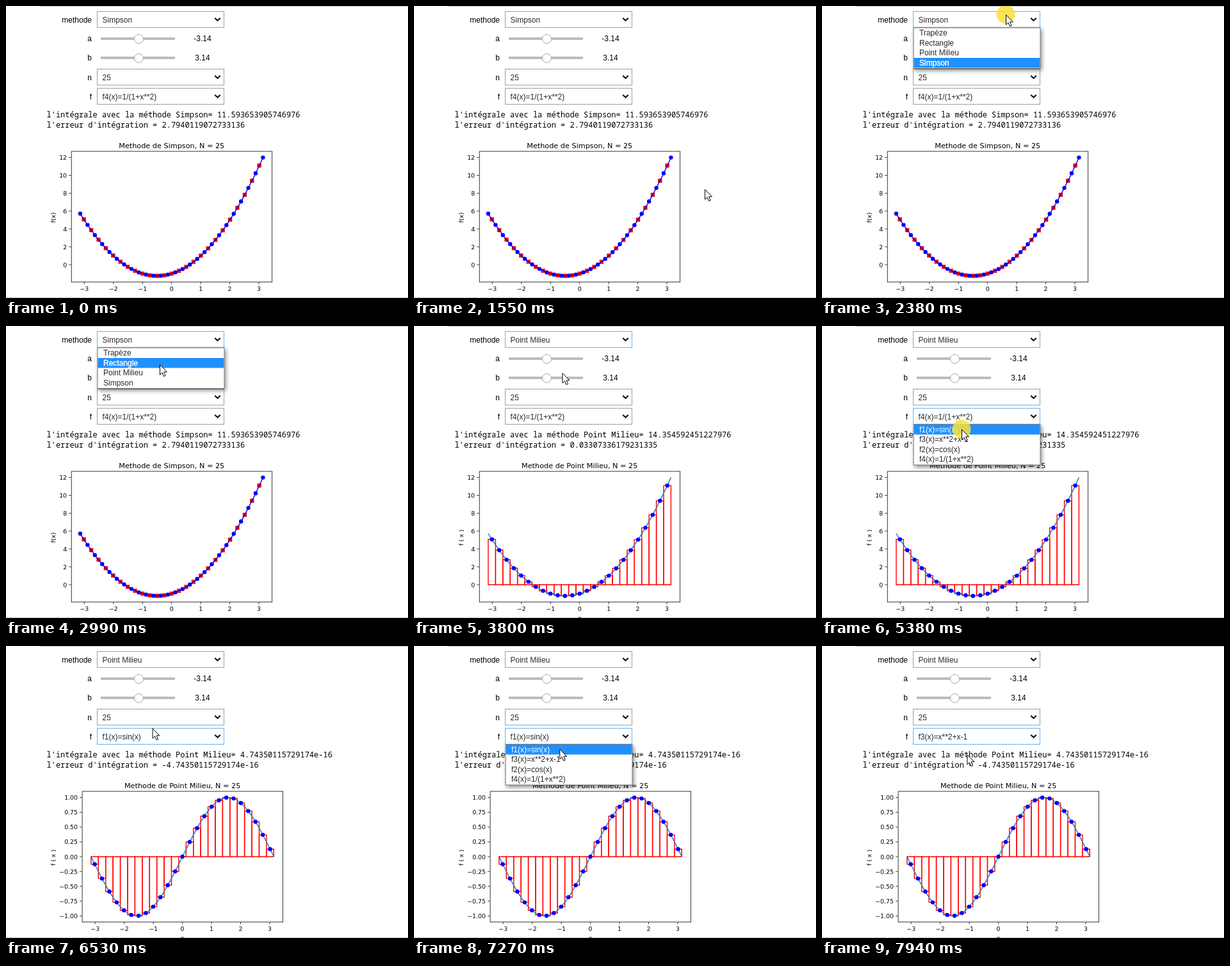
Recreate the animation shown at these times as an HTML page. Size 628x456 px, loop 8000 ms.

```html
<!DOCTYPE html>
<html lang="fr">
<head>
<meta charset="utf-8">
<title>Intégration numérique</title>
<style>
html, body { margin: 0; width: 100%; height: 100%; overflow: hidden; background: #fff; }
svg { display: block; width: 628px; height: 456px; }
text { white-space: pre; }
.ui { font: 12px "Liberation Sans", Arial, sans-serif; }
.out { font: 12px "Noto Sans Mono", monospace; }
.plot { font: 9.4px "DejaVu Sans", sans-serif; }
.menu { filter: drop-shadow(2px 3px 3px rgba(0, 0, 0, .45)); }
</style>
</head>
<body>
<svg id="stage" viewBox="0 0 628 456" xmlns="http://www.w3.org/2000/svg"></svg>
<script>
const NS = "http://www.w3.org/2000/svg";
const LOOP = 8000;
const stage = document.getElementById("stage");

function add(parent, tag, attrs, content) {
  const el = document.createElementNS(NS, tag);
  for (const k in attrs) el.setAttribute(k, attrs[k]);
  if (content !== undefined) el.textContent = content;
  parent.appendChild(el);
  return el;
}
const label = (parent, x, y, str, anchor = "start", more = {}) =>
  add(parent, "text", { x, y, "text-anchor": anchor, ...more }, str);
const show = (el, on) => el.setAttribute("visibility", on ? "visible" : "hidden");
const path = pts => "M" + pts.map(p => p[0].toFixed(2) + " " + p[1].toFixed(2)).join("L");
const num = (v, digits) => v.toFixed(digits).replace("-", "−");

// ---- controls ----
const ui = add(stage, "g", { class: "ui" });
add(ui, "rect", { x: 54, y: 0, width: 574, height: 1, fill: "#c8c8c8" });
add(ui, "rect", { x: 0, y: 455, width: 628, height: 1, fill: "#c8c8c8" });

function select(name, y, value) {
  label(ui, 134, y + 17.5, name, "end");
  const box = add(ui, "rect", { x: 142.5, y: y + .5, width: 198, height: 25, fill: "#fff" });
  const text = label(ui, 150.5, y + 17.5, value, "start", { fill: "#2a2a2a" });
  add(ui, "path", { d: `M326.3 ${y + 10.7}l4.2 4.2l4.2 -4.2`, fill: "none", stroke: "#000", "stroke-width": 2 });
  return { text, focus: on => box.setAttribute("stroke", on ? "#64b5f6" : "#9e9e9e") };
}
function slider(name, y, value) {
  label(ui, 134, y + 4, name, "end");
  add(ui, "rect", { x: 148, y: y - 2, width: 116, height: 4, fill: "#bdbdbd" });
  add(ui, "circle", { cx: 207.5, cy: y + .5, r: 7, fill: "#fff", stroke: "#a8a8a8" });
  label(ui, 307, y + 4, value, "middle");
}
const method = select("methode", 8, "Simpson");
slider("a", 51, "-3.14");
slider("b", 81, "3.14");
select("n", 98, "25").focus(false);
const func = select("f", 128, "f4(x)=1/(1+x**2)");

// ---- printed result ----
const out = add(stage, "g", { class: "out" });
const line1 = label(out, 63.5, 174, "");
const line2 = label(out, 63.5, 190, "");

// ---- charts ----
const A = -3.14, N = 25, H = -2 * A / N, UNIT = 45.45;
const poly = x => x * x + x - 1;

function chart(o) {
  const g = add(stage, "g", { class: "plot" });
  const X = x => o.cx + x * UNIT, Y = y => o.y0 - y * o.unit;
  const left = o.cx - 157, right = o.cx + 157, top = 227, bottom = 431;
  const curve = (n, color) => {
    const pts = Array.from({ length: n + 1 }, (_, i) => {
      const x = A - 2 * A * i / n;
      return [X(x), Y(o.fn(x))];
    });
    add(g, "path", { d: path(pts), fill: "none", stroke: color, "stroke-width": 1.4 });
  };
  const dot = x => add(g, "circle", { cx: X(x), cy: Y(o.fn(x)), r: 3.2, fill: "#00f" });
  const mids = Array.from({ length: N }, (_, i) => A + (i + .5) * H);

  if (o.bars) {
    for (const m of mids) {
      const y = Y(o.fn(m)), a = X(m - H / 2), b = X(m + H / 2);
      add(g, "path", { d: path([[a, o.y0], [a, y], [b, y], [b, o.y0]]) + "Z", fill: "none", stroke: "#f00", "stroke-width": 1.4 });
    }
    curve(100, "#1f77b4");
    mids.forEach(dot);
  } else {
    for (const m of mids)
      add(g, "rect", { x: X(m) - 3.2, y: Y(o.fn(m)) - 3.2, width: 6.4, height: 6.4, fill: "#f00" });
    curve(100, "#0000e0");
    for (let i = 0; i <= N; i++) dot(A + i * H);
  }

  add(g, "rect", { x: left + .5, y: top, width: right - left - .5, height: bottom - top, fill: "none", stroke: "#000", "stroke-width": .8 });
  let ticks = "";
  for (let x = -3; x <= 3; x++) {
    ticks += `M${X(x)} ${bottom}v3.4`;
    label(g, X(x), 445.2, num(x, 0), "middle");
  }
  for (let y = o.from; y <= o.to; y += o.step) {
    ticks += `M${left} ${Y(y)}h-3.4`;
    label(g, left - 6.6, Y(y) + 3.5, num(y, o.digits), "end");
  }
  add(g, "path", { d: ticks, stroke: "#000", "stroke-width": .8 });
  label(g, o.cx, 222, `Methode de ${o.title}, N = 25`, "middle", { "font-size": 11.25 });
  label(g, 0, 0, o.bars ? "f ( x )" : "f(x)", "middle", { transform: "translate(76.7 330.5) rotate(-90)" });
  if (o.bars) label(g, o.cx, 458.5, "x", "middle");
  return g;
}
const square = { fn: poly, cx: 258.7, y0: 404, unit: 13.95, from: 0, to: 12, step: 2, digits: 0 };
const sine = { fn: Math.sin, cx: 275.6, y0: 329, unit: 92.5, from: -1, to: 1, step: .25, digits: 2 };
const results = [
  { at: 0, name: "Simpson", value: "11.593653905746976", error: "2.7940119072733136", plot: chart({ ...square, title: "Simpson" }) },
  { at: 3800, name: "Point Milieu", value: "14.354592451227976", error: "0.03307336179231335", plot: chart({ ...square, title: "Point Milieu", bars: true }) },
  { at: 5710, name: "Point Milieu", value: "4.74350115729174e-16", error: "-4.74350115729174e-16", plot: chart({ ...sine, title: "Point Milieu", bars: true }) }
];

// ---- drop-down lists ----
const ROW = 15.5;
function menu(top, items, weight) {
  const g = add(stage, "g", { class: "ui menu" });
  add(g, "rect", { x: 143, y: top - .5, width: 198, height: ROW * items.length + 1.5, fill: "#fff", stroke: "#777", "stroke-width": 1 });
  const bar = add(g, "rect", { x: 143.5, width: 197, height: ROW, fill: "#1e90ff" });
  const texts = items.map((s, i) => label(g, 152, top + i * ROW + 11.7, s));
  return {
    draw(open, y, chosen) {
      show(g, open);
      const row = y < top ? chosen : Math.min(items.length - 1, Math.floor((y - top) / ROW));
      bar.setAttribute("y", top + row * ROW);
      texts.forEach((t, i) => {
        t.setAttribute("fill", i === row ? "#fff" : "#2a2a2a");
        t.setAttribute("stroke", i === row ? "#fff" : "none");
        t.setAttribute("stroke-width", weight);
      });
    }
  };
}
const funcs = ["f1(x)=sin(x)", "f3(x)=x**2+x-1", "f2(x)=cos(x)", "f4(x)=1/(1+x**2)"];
const methodMenu = menu(34.5, ["Trapèze", "Rectangle", "Point Milieu", "Simpson"], .4);
const funcMenu = menu(154, funcs, 0);

// ---- pointer ----
const glow = add(stage, "circle", { r: 14.5, fill: "#fbe03a", "fill-opacity": .85 });
const pointer = add(stage, "path", {
  d: "M.5 .7V16.2L4 12.9L6.5 18.7L9.1 17.6L6.6 11.9H11.4Z",
  fill: "#fff", stroke: "#000", "stroke-width": 1
});
// first change, last change, steps, x, y
const moves = [
  [1340, 2100, 12, 318, 30],
  [2170, 2310, 3, 287, 13],
  [2640, 2990, 6, 240, 60],
  [3190, 3260, 2, 237, 70],
  [3600, 3800, 4, 231.5, 73],
  [3930, 4280, 6, 228, 117],
  [4430, 4640, 4, 227, 142],
  [5110, 5310, 4, 218, 161],
  [6110, 6530, 7, 228.5, 128],
  [6730, 6800, 2, 228, 135],
  [7130, 7340, 4, 227, 169],
  [7540, 7540, 1, 226.5, 169]
];
function place(t) {
  let x = 568, y = 500;
  for (const [t0, t1, n, toX, toY] of moves) {
    if (t < t0) break;
    const k = n > 1 ? Math.floor((t - t0) / (t1 - t0) * (n - 1) + 1e-6) + 1 : 1;
    const p = Math.min(1, k / n);
    const e = t0 === 1340 ? 1 - (1 - p) ** 1.5 : p;
    x += (toX - x) * e;
    y += (toY - y) * e;
  }
  return [x, y];
}
const clicks = [[2310, 2440], [3530, 3660], [4840, 4910], [5380, 5510], [6870, 6930], [7740, 7870]];
const within = (t, [a, b]) => t >= a && t < b;

function draw(t) {
  const [x, y] = place(t);
  pointer.setAttribute("transform", `translate(${x} ${y})`);
  show(pointer, t >= 1340);
  glow.setAttribute("cx", x);
  glow.setAttribute("cy", y);
  show(glow, clicks.some(c => within(t, c)));

  method.focus(within(t, [2310, 4840]));
  func.focus(t >= 4840);
  method.text.textContent = t < 3660 ? "Simpson" : "Point Milieu";
  func.text.textContent = funcs[t < 5510 ? 3 : t < 7870 ? 0 : 1];
  methodMenu.draw(within(t, [2380, 3660]), y, 3);
  funcMenu.draw(within(t, [4840, 5510]) || within(t, [6930, 7870]), y, t < 5510 ? 3 : 0);

  const now = results.filter(r => t >= r.at).pop();
  line1.textContent = `l'intégrale avec la méthode ${now.name}= ${now.value}`;
  line2.textContent = `l'erreur d'intégration = ${now.error}`;
  results.forEach(r => show(r.plot, r === now));
}
function tick() {
  draw(performance.now() % LOOP);
  requestAnimationFrame(tick);
}
tick();
</script>
</body>
</html>
```
